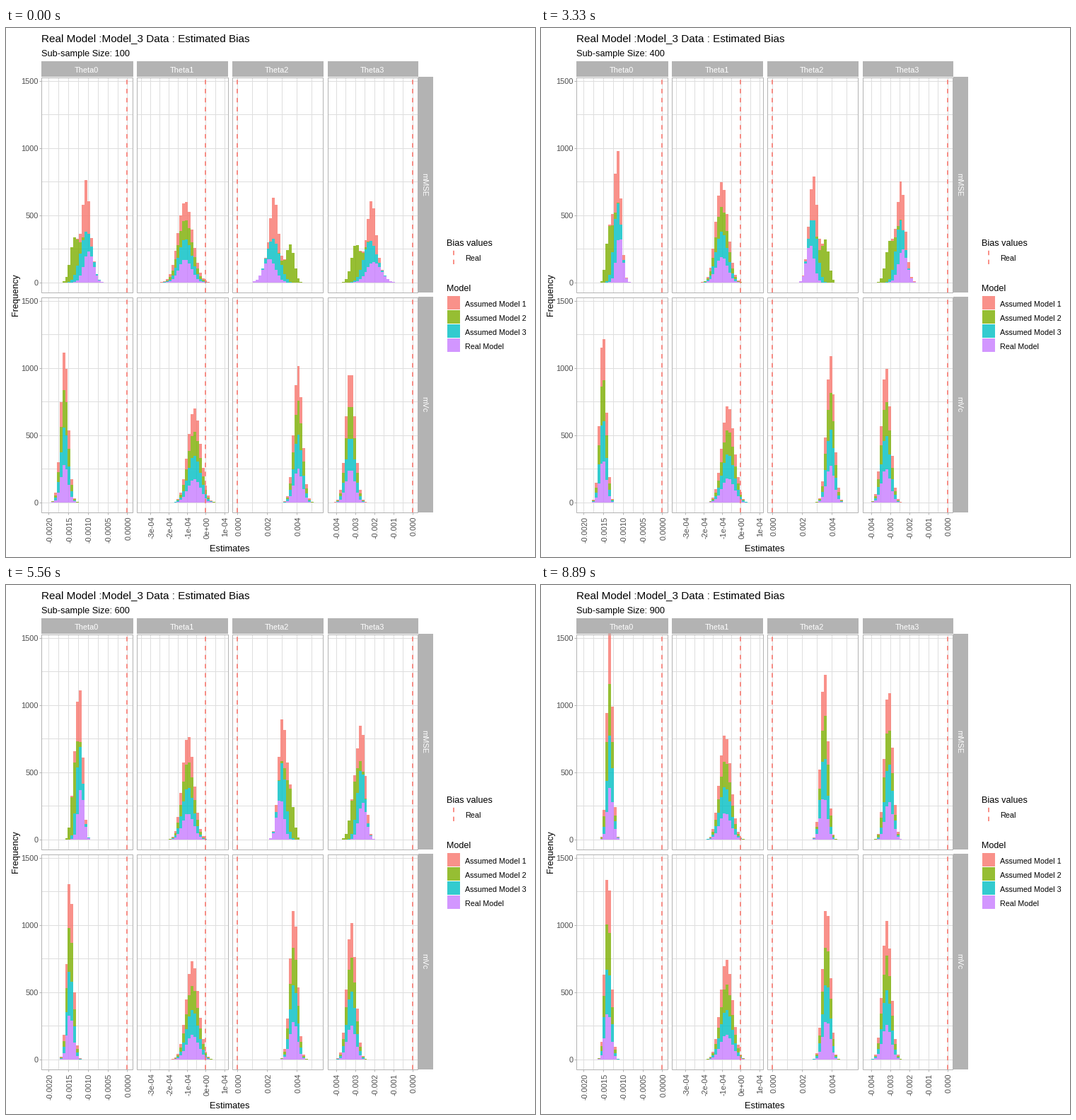
A matplotlib script for the animation above (10 s loop, 748 by 748 pixels).

```python
import math

import matplotlib.pyplot as plt
import numpy as np
from matplotlib.animation import FuncAnimation
from matplotlib.collections import LineCollection, PolyCollection
from matplotlib.patches import Rectangle

SIDE, DPI = 748, 64
PT = 72 / DPI  # points per pixel
FRAMES, INTERVAL, STEPS = 200, 50, 9

GREY, GRID, RED = "#B3B3B3", "#DEDEDE", "#F8766D"
FILLS = [RED, "#7CAE00", "#00BFC4", "#C77CFF"]
MODELS = ["Assumed Model 1", "Assumed Model 2", "Assumed Model 3", "Real Model"]

LEFT = [50.5 + 135 * c for c in range(4)]
RIGHT = [179.5 + 134.33 * c for c in range(4)]
ROWS = [(69.5, 373.5, 359.5), (380.5, 684.5, 670.5)]  # top, bottom, zero count
ZERO = [171.5, 282.5, 327.5, 575.0]  # x pixel of value 0
BIN = 3.91
PER_COUNT = 0.1897
REPS = 1000

# column: (pixels per major step, first step, labels)
AXES = [
    (27.75, -4, [f"{v / 2000:.4f}" for v in range(-4, 1)]),
    (26.1, -3, ["-3e-04", "-2e-04", "-1e-04", "0e+00", "1e-04"]),
    (41.9, 0, ["0.000", "0.002", "0.004"]),
    (27.0, -4, [f"{v / 1000:.3f}" for v in range(-4, 1)]),
]

# Positions are in bins from zero.
# mMSE: where each model starts, its spread there, and the shared goal
MSE = [
    ([-15.0, -19.2, -15.8, -14.0], [1.0, 1.4, 2.0, 1.7], (-19.2, 0.97)),
    ([-7.4] * 4, [2.95, 2.75, 2.55, 2.3], (-5.5, 2.0)),
    ([13.4, 19.0, 13.8, 11.5], [1.2, 1.4, 2.0, 2.2], (19.0, 1.2)),
    ([-14.6, -20.7, -16.0, -14.0], [1.25, 1.5, 2.1, 2.6], (-21.8, 1.35)),
]
# mVc: all models drift together from (mean, spread) to (mean, spread)
VC = [
    ((-22.72, 1.37), (-19.4, 0.97)),
    ((-4.2, 2.25), (-5.25, 2.08)),
    ((21.87, 1.54), (19.3, 1.27)),
    ((-22.5, 1.58), (-22.0, 1.5)),
]

cdf = np.vectorize(lambda z: 0.5 * (1 + math.erf(z / math.sqrt(2))))


def drift(start, goal, t, power, rate):
    """Mean moves along a power curve, spread decays towards its goal."""
    mean = start[0] + (goal[0] - start[0]) * t ** power
    sd = goal[1] + (start[1] - goal[1]) * math.exp(-rate * t)
    return mean, sd


def curve(row, col, model, t):
    if row == 1:
        return drift(*VC[col], t, 0.9, 1.5)
    means, sds, goal = MSE[col]
    return drift((means[model], sds[model]), goal, t, 1.2, 5)


def stacks(step):
    """Rectangles of the stacked histograms, one list per model."""
    t = step / 8.5
    rects = [[] for _ in MODELS]
    edges = np.arange(-30, 31) - 0.5
    for row, (_, _, base) in enumerate(ROWS):
        floor = base + 0.5
        for col, zero in enumerate(ZERO):
            xs = np.round(zero + edges * BIN)
            total = np.zeros(len(edges) - 1)
            low = np.zeros_like(total)
            for m in reversed(range(len(MODELS))):
                mean, sd = curve(row, col, m, t)
                total += REPS * np.diff(cdf((edges - mean) / sd))
                high = np.round(total * PER_COUNT)
                for a, b, y0, y1 in zip(xs, xs[1:], floor - low, floor - high):
                    if y1 < y0:
                        rects[m].append([(a, y0), (b, y0), (b, y1), (a, y1)])
                low = high
    return rects


fig = plt.figure(figsize=(SIDE / DPI, SIDE / DPI), dpi=DPI, facecolor="white")
ax = fig.add_axes([0, 0, 1, 1])
ax.set(xlim=(0, SIDE), ylim=(SIDE, 0))
ax.axis("off")


def text(x, y, s, size=11, color="black", ha="left", angle=0):
    return ax.text(x, y, s, fontsize=size * PT, color=color, ha=ha, va="baseline",
                   rotation=angle, rotation_mode="anchor", zorder=5,
                   family="Liberation Sans")


def box(x0, y0, x1, y1, **style):
    ax.add_patch(Rectangle((x0, y0), x1 - x0, y1 - y0, zorder=4, **style))


def lines(segments, color):
    ax.add_collection(LineCollection(segments, colors=color, linewidths=PT, zorder=1),
                      autolim=False)


def dashed(x, y0, y1):
    ax.plot([x, x], [y0, y1], color=RED, lw=1.6 * PT, dashes=(4, 4), zorder=3)


grid, ticks = [], []
for (top, bottom, base), name in zip(ROWS, ["mMSE", "mVc"]):
    for n in range(0, 1501, 250):
        y = base - n * PER_COUNT
        grid += [[(a, y), (b, y)] for a, b in zip(LEFT, RIGHT)]
        if n % 500 == 0:
            ticks.append([(47, y), (50, y)])
            text(45.5, y + 4.3, str(n), color="#4D4D4D", ha="right")

    for col, (step, first, labels) in enumerate(AXES):
        for half in range(2 * first - 1, 2 * (first + len(labels)) + 1):
            x = ZERO[col] + half * step / 2
            if LEFT[col] < x < RIGHT[col]:
                grid.append([(x, top), (x, bottom)])
        dashed(ZERO[col], bottom, top)
        box(LEFT[col], top, RIGHT[col], bottom, fc="none", ec=GREY, lw=PT)

    box(583, top - 0.5, 604, bottom + 0.5, fc=GREY, lw=0)
    text(588, (top + bottom) / 2, name, color="white", ha="center", angle=-90)

for col, (step, first, labels) in enumerate(AXES):
    for i, label in enumerate(labels):
        x = ZERO[col] + (first + i) * step
        ticks.append([(x, 685), (x, 688)])
        text(x + 5, 690.5, label, color="#4D4D4D", ha="right", angle=90)
    box(LEFT[col] - 0.5, 47, RIGHT[col] + 0.5, 69, fc=GREY, lw=0)
    text((LEFT[col] + RIGHT[col]) / 2 - 1, 63, f"Theta{col}", color="white", ha="center")

lines(grid, GRID)
lines(ticks, GREY)

text(50, 19, "Real Model :Model_3 Data : Estimated Bias", 15.3)
subtitle = text(50, 39.5, "", 12.8)
text(17.5, 377, "Frequency", 12.6, ha="center", angle=90)
text(316.5, 740, "Estimates", 12.9, ha="center")

text(623.5, 307.5, "Bias values", 12.6)
dashed(633, 334, 314)
text(649, 329, "Real", 10.9)
text(623.5, 371.5, "Model", 12.6)
for i, (name, fill) in enumerate(zip(MODELS, FILLS)):
    y = 379 + 20 * i
    box(624, y, 642, y + 19, fc=fill, alpha=0.8, lw=0)
    text(649, y + 14.5, name, 10.8)

bars = []
for fill in FILLS:
    bars.append(PolyCollection([], facecolors=fill, alpha=0.8, linewidths=0,
                               antialiaseds=False, zorder=2))
    ax.add_collection(bars[-1], autolim=False)

STATES = [stacks(k) for k in range(STEPS)]


def draw(i):
    k = (STEPS * (i + 1) - 1) // FRAMES
    subtitle.set_text(f"Sub-sample Size: {100 * (k + 1)}")
    for part, rects in zip(bars, STATES[k]):
        part.set_verts(rects)
    return [subtitle, *bars]


anim = FuncAnimation(fig, draw, frames=FRAMES, interval=INTERVAL, repeat=True,
                     repeat_delay=0, cache_frame_data=False)
plt.show()
```
